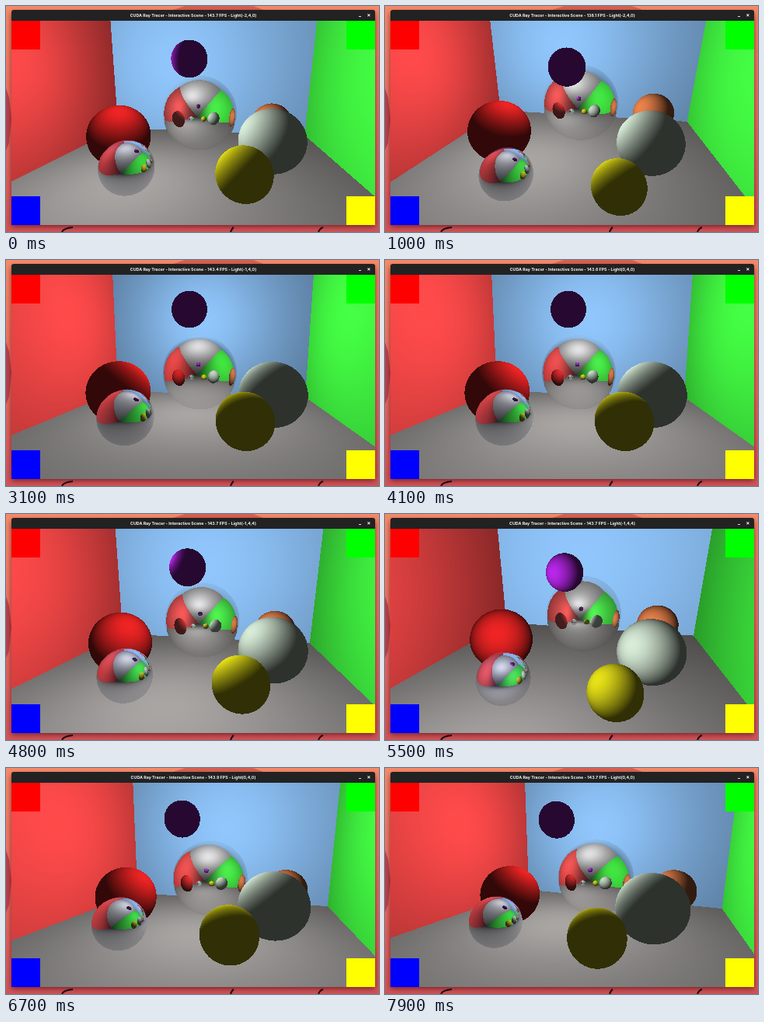
Write an HTML page with a canvas that moves like this. It is 480 px wide and 291 px high and loops after 8 s.

```html
<!DOCTYPE html>
<html lang="en">
<head>
<meta charset="utf-8">
<title>Ray tracer window</title>
<style>
html, body { margin: 0; width: 100%; height: 100%; overflow: hidden; background: #e8665c; }
canvas { position: absolute; left: 0; top: 0; width: 480px; height: 291px; }
#bar {
  position: absolute; left: 7px; top: 5px; width: 468px; height: 14px;
  background: #222; border-radius: 3px 3px 0 0; color: #f4f4f4;
  font: 700 5.3px/14px Inter, "Open Sans", sans-serif; text-align: center; white-space: nowrap;
}
#bar i { position: absolute; left: 447px; top: 8px; width: 3px; height: 1px; background: #ddd; }
#bar b { position: absolute; left: 457px; top: 0; width: 6px; font-size: 7px; }
</style>
</head>
<body>
<canvas id="stage" width="480" height="291"></canvas>
<div id="bar"><span id="title"></span><i></i><b>×</b></div>
<script>
const g = document.getElementById('stage').getContext('2d');
const title = document.getElementById('title');
const LOOP = 8000, W = 468, H = 263, FOCAL = 300, DIST = 10, AMBIENT = .21;

// Camera orbit in degrees and light position over time
const keys = [
  { t: 200, az: 9, el: 12.5, light: [-2.7, 2.8, 1.2] },
  { t: 1000, az: 10.5, el: 21, light: [-2.3, 2.8, -.5] },
  { t: 2200, az: 9, el: 8, light: [-1, 3, -4] },
  { t: 4100, az: 9, el: 8, light: [0, 3.2, -1] },
  { t: 5500, az: 13, el: 18.5, light: [-1.3, 2.8, 5.3] },
  { t: 6700, az: 17.5, el: 10, light: [0, 2.9, -.5] },
  { t: 7900, az: 23, el: 11, light: [-1.3, 2.8, -1.3] }
];

const balls = [
  { c: [-.27, -.32, -4.17], r: 2.22, color: [215, 215, 215], mirror: .88 },
  { c: [-1.83, -1.01, 2.72], r: .92, color: [140, 160, 255], mirror: .8 },
  { c: [-3.69, -.89, -.55], r: 1.48, color: [240, 36, 36] },
  { c: [3.26, -.65, .02], r: 1.34, color: [216, 236, 216] },
  { c: [2.01, -.87, 2.93], r: .86, color: [232, 226, 24] },
  { c: [.13, 2.56, 1.67], r: .61, color: [185, 38, 235] },
  { c: [4.05, -.9, -4.8], r: 1.17, color: [236, 132, 76] }
];

// The room is open towards the viewer
const walls = [
  { axis: 0, at: -7.7, color: [255, 74, 74] },
  { axis: 0, at: 7.1, color: [68, 255, 68] },
  { axis: 2, at: -8.2, color: [144, 198, 252] },
  { axis: 1, at: -2.5, color: [168, 165, 163] },
  { axis: 1, at: 8, color: [230, 230, 232] }
];

const dot = (a, b) => a[0] * b[0] + a[1] * b[1] + a[2] * b[2];
const sub = (a, b) => [a[0] - b[0], a[1] - b[1], a[2] - b[2]];
const along = (o, d, k) => [o[0] + d[0] * k, o[1] + d[1] * k, o[2] + d[2] * k];
const lerp = (a, b, k) => a + (b - a) * k;
const norm = v => {
  const n = Math.hypot(v[0], v[1], v[2]);
  return [v[0] / n, v[1] / n, v[2] / n];
};

function trace(o, d, light, bounces) {
  let near = 1e4, hit = null;
  for (const w of walls) {
    const t = (w.at - o[w.axis]) / d[w.axis];
    if (t > 1e-3 && t < near) { near = t; hit = w; }
  }
  for (const s of balls) {
    const q = sub(o, s.c), b = dot(q, d), disc = b * b - dot(q, q) + s.r * s.r;
    if (disc < 0) continue;
    const t = -b - Math.sqrt(disc);
    if (t > 1e-3 && t < near) { near = t; hit = s; }
  }
  if (!hit) return [0, 0, 0];

  const p = along(o, d, near);
  let n = [0, 0, 0];
  if (hit.r) n = norm(sub(p, hit.c));
  else n[hit.axis] = -Math.sign(d[hit.axis]);
  const k = AMBIENT + (1 - AMBIENT) * Math.max(0, dot(n, norm(sub(light, p))));
  const own = hit.color.map(v => v * k);
  if (!hit.mirror || !bounces) return own;
  const seen = trace(p, along(d, n, -2 * dot(d, n)), light, bounces - 1);
  return own.map((v, i) => lerp(v, seen[i], hit.mirror));
}

const view = g.createImageData(W, H);

function render(az, el, light) {
  const sa = Math.sin(az), ca = Math.cos(az), se = Math.sin(el), ce = Math.cos(el);
  const back = [sa * ce, se, ca * ce], right = [ca, 0, -sa], up = [-sa * se, ce, -ca * se];
  const eye = back.map(v => v * DIST);
  for (let j = 0, p = 0; j < H; j++) for (let i = 0; i < W; i++, p += 4) {
    const u = (i + .5 - W / 2) / FOCAL, v = (H / 2 - j - .5) / FOCAL;
    const dir = norm(sub(along(along([0, 0, 0], right, u), up, v), back));
    const c = trace(eye, dir, light, 3);
    view.data[p] = c[0];
    view.data[p + 1] = c[1];
    view.data[p + 2] = c[2];
    view.data[p + 3] = 255;
  }
  g.putImageData(view, 7, 19);
}

function shape(points, color) {
  g.beginPath();
  points.forEach(p => g.lineTo(p[0], p[1]));
  g.fillStyle = color;
  g.fill();
}

function desktop() {
  const s = g.createLinearGradient(0, 0, 0, 291);
  s.addColorStop(0, '#f58a68');
  s.addColorStop(.5, '#ee6c5e');
  s.addColorStop(1, '#cf5457');
  g.fillStyle = s;
  g.fillRect(0, 0, 480, 291);
  shape([[212, 6], [230, 0], [318, 0], [334, 6]], '#d8604f');
  shape([[0, 106], [4, 118], [7, 145], [4, 176], [0, 186]], '#b8434c');
  g.save();
  g.shadowColor = 'rgba(60,0,10,.65)';
  g.shadowBlur = 7;
  g.shadowOffsetY = 2;
  g.fillStyle = '#222';
  g.fillRect(7, 7, W, 275);
  g.restore();
  g.strokeStyle = '#1c0c14';
  g.lineWidth = 2;
  for (const [x, d] of [[72, 14], [289, 4], [402, 6]]) {
    g.beginPath();
    g.moveTo(x, 291);
    g.quadraticCurveTo(x + 2, 286, x + d, 285);
    g.stroke();
  }
}

function corners() {
  for (const [x, y, c] of [[7, 19, '#f00'], [438, 19, '#0f0'], [7, 245, '#00f'], [438, 245, '#ff0']]) {
    g.fillStyle = c;
    g.fillRect(x, y, 37, 37);
  }
}

// Title: frame rate and light position, renewed every 900 ms
const rates = [143.7, 138.1, 142.6, 143.2, 143.4, 143.6, 143.7, 143.8, 143.9, 143.7];
const spots = ['-2,4,0', '-2,4,0', '-2,4,0', '-2,4,0', '-1,4,0', '0,4,0', '-1,4,4', '-1,4,2', '0,4,0', '0,4,0'];

function draw(t) {
  let i = 0;
  while (i < keys.length - 2 && t >= keys[i + 1].t) i++;
  const a = keys[i], b = keys[i + 1];
  const k = Math.min(1, Math.max(0, (t - a.t) / (b.t - a.t)));
  const rad = name => lerp(a[name], b[name], k) * Math.PI / 180;
  render(rad('az'), rad('el'), a.light.map((v, n) => lerp(v, b.light[n], k)));
  corners();

  const n = t < 300 ? 0 : 1 + Math.floor((t - 300) / 900);
  title.textContent = `CUDA Ray Tracer - Interactive Scene - ${rates[n].toFixed(1)} FPS - Light(${spots[n]})`;
}

// The picture is renewed ten times a second
let shown = -1;
function tick() {
  const t = Math.floor(performance.now() % LOOP / 100) * 100;
  if (t !== shown) draw(shown = t);
  requestAnimationFrame(tick);
}
desktop();
tick();
</script>
</body>
</html>
```
